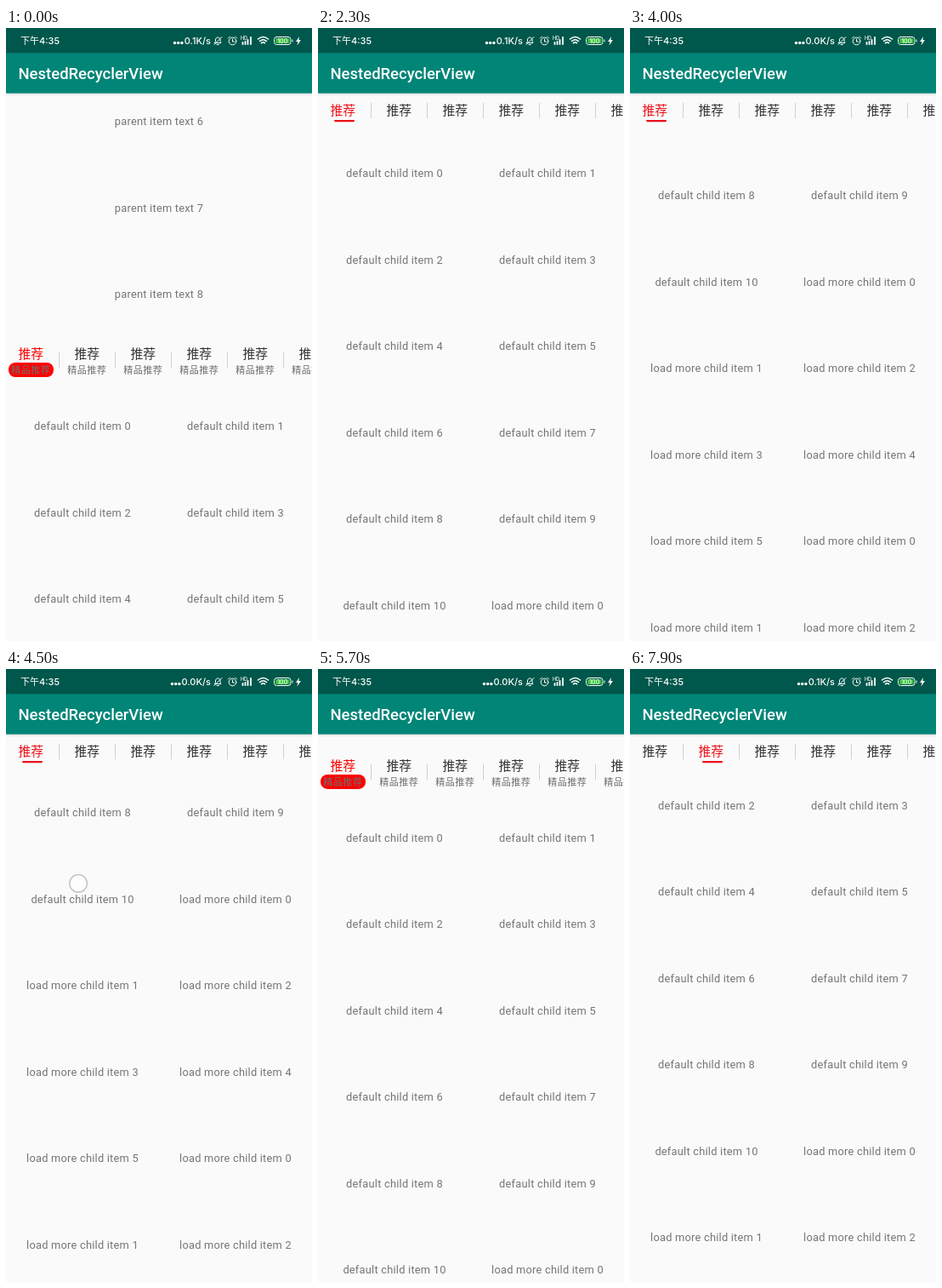
Animation of 360 by 720 pixels, one loop 8000 ms. Source, as an HTML page:

```html
<!DOCTYPE html>
<html lang="zh">
<head>
<meta charset="utf-8">
<style>
html, body { margin: 0; width: 100%; height: 100%; overflow: hidden; background: #fafafa; }
svg { display: block; }
.item { font: 12.83px Roboto, sans-serif; letter-spacing: .0178em; fill: #757575; text-anchor: middle; }
.tab { font: 14.8px "Noto Sans CJK SC", "Noto Sans CJK", sans-serif; text-anchor: middle; }
.sub { font: 11.1px "Noto Sans CJK SC", "Noto Sans CJK", sans-serif; letter-spacing: .0333em; fill: #6f6f6f; text-anchor: middle; }
.bar { font: 500 18.48px Roboto, sans-serif; fill: #fff; }
.status { font: 500 11px Inter, "Noto Sans CJK SC", "Noto Sans CJK", sans-serif; fill: #fff; }
.line { fill: none; stroke: #fff; stroke-width: 1; stroke-linecap: round; }
</style>
</head>
<body>
<svg id="stage" width="360" height="720" viewBox="0 0 360 720">
  <defs>
    <linearGradient id="shade" x2="0" y2="1">
      <stop stop-color="#000" stop-opacity=".12"/><stop offset="1" stop-color="#000" stop-opacity="0"/>
    </linearGradient>
  </defs>
  <rect width="360" height="720" fill="#fafafa"/>
  <g id="parents"></g>
  <g id="pageA"></g>
  <g id="pageB"></g>
  <g id="tabs">
    <rect id="tabBack" y="-19" width="360" fill="#fafafa"/>
    <g id="marks"></g>
    <g id="expanded"><rect id="pill" y="11" width="53" height="17" rx="8" fill="#f00"/></g>
    <rect id="underline" y="12" width="24" height="2.2" rx="1.1" fill="#ec1019"/>
    <g id="titles"></g>
  </g>
  <rect y="76" width="360" height="4" fill="url(#shade)"/>
  <rect width="360" height="76.7" fill="#008577"/>
  <rect width="360" height="29.3" fill="#00574b"/>
  <text class="bar" x="14.5" y="60.3">NestedRecyclerView</text>
  <text class="status" x="17" y="19">下午4:35</text>
  <text class="status" id="speed" x="241" y="19" text-anchor="end"></text>
  <g id="dots" fill="#fff"><circle cx="198.5" cy="17.5" r="1.7"/><circle cx="202.7" cy="17.5" r="1.7"/><circle cx="206.9" cy="17.5" r="1.7"/></g>
  <g class="line">
    <path d="M245.5 17.5h7.500c-1-1-1-2-1-3.500 0-4-5.500-4-5.500 0 0 1.500 0 2.500-1 3.500M248 19.500h2.500M254 10.500l-9 9"/>
    <circle cx="266.500" cy="15.500" r="4.300"/><path d="M266.500 13v3h2M261.500 12l2-2M271.500 12l-2-2"/>
    <path d="M278.500 19v-2M281.500 19v-3M284.500 19v-5M288 19v-8" stroke-width="1.800"/>
    <path d="M296.500 13q6-5 12 0M298.500 15.500q4-3.500 8 0M300.500 17.700q2-1.600 4 0" stroke-width="1.600"/>
    <rect x="315.500" y="10.500" width="19.500" height="9" rx="3"/><path d="M337 14v2"/>
  </g>
  <rect x="317" y="12" width="16.500" height="6" rx="1.500" fill="#35c43a"/>
  <text class="status" x="325.200" y="17.700" text-anchor="middle" style="font-size:7px">100</text>
  <text class="status" x="276" y="13.500" style="font-size:5.500px">HD</text>
  <path d="M345 10l-4 6h2.500l-1 4.500 4.500-6.500h-2.700z" fill="#fff"/>
  <circle id="touch" r="10.300" fill="#fff" fill-opacity=".6" stroke="#c4c6c9" stroke-width="1.600"/>
</svg>
<script>
const LOOP = 8000, PITCH = 101.5, TAB_STEP = 66, PINNED = 96;
const $ = id => document.getElementById(id);

function add(parent, tag, attrs, text = "") {
  const el = document.createElementNS("http://www.w3.org/2000/svg", tag);
  for (const key in attrs) el.setAttribute(key, attrs[key]);
  el.textContent = text;
  return parent.appendChild(el);
}
const set = (el, key, value) => el.setAttribute(key, value);
const move = (el, x, y) => set(el, "transform", `translate(${x} ${y})`);
const show = (el, on) => set(el, "visibility", on ? "visible" : "hidden");

for (let i = 6; i < 9; i++)
  add($("parents"), "text", { class: "item", x: 180, y: (i - 9) * PITCH - 49 }, `parent item text ${i}`);

for (const page of [$("pageA"), $("pageB")])
  for (let i = 0; i < 35; i++) {
    const label = i < 11 ? `default child item ${i}` : `load more child item ${(i - 11) % 6}`;
    add(page, "text", { class: "item", x: i % 2 ? 270 : 90, y: (i >> 1) * PITCH + 4.5 }, label);
  }

const titles = [];
for (let i = 0; i < 6; i++) {
  const x = 29.2 + i * TAB_STEP;
  titles.push(add($("titles"), "text", { class: "tab", x, y: 5.7 }, "推荐"));
  add($("expanded"), "text", { class: "sub", x, y: 24 }, "精品推荐");
  add($("marks"), "rect", { x: 62 + i * TAB_STEP, y: 0, width: 1, height: 18, fill: "#d0d0d0" });
}

// A drag speeds up under the finger, a fling slows down after it.
const drag = u => u * u;
const fling = u => 1 - (1 - u) ** 3;

// Steps: [start, end, value reached, easing]
const scroll = [
  [1600, 2000, 270, drag], [2000, 3200, 98.8, fling],
  [3400, 3600, 0, drag], [3600, 4400, -239, fling],
  [4450, 4900, -96.3, drag], [4900, 6000, 204.5, fling],
  [7300, 7600, 140, drag], [7600, 8100, 53.5, fling]
];
const swipe = [[6600, 6800, 170, drag], [6800, 7200, 360, fling]];

function valueAt(t, value, steps) {
  for (const [start, end, goal, ease] of steps) {
    if (t < start) break;
    value += (goal - value) * ease(Math.min(1, (t - start) / (end - start)));
  }
  return value;
}

// Touches: [start, end, x, y, last x, last y]
const touches = [
  [1600, 2000, 80, 549, 98, 345],
  [3400, 3600, 90, 520, 98, 415],
  [4450, 4900, 85, 250, 92, 395],
  [6600, 6800, 245, 480, 67, 472],
  [7300, 7600, 85, 500, 95, 430]
];
const FADE = 150;

function drawTouch(t) {
  const hit = touches.find(([start, end]) => t >= start && t < end + FADE);
  show($("touch"), hit);
  if (!hit) return;
  const [start, end, x, y, lastX, lastY] = hit;
  const u = drag(Math.min(1, (t - start) / (end - start)));
  move($("touch"), x + (lastX - x) * u, y + (lastY - y) * u);
  set($("touch"), "opacity", Math.min(1, 1 - (t - end) / FADE) ** 2);
}

function draw(t) {
  const y = valueAt(t, 467.5, scroll);
  const pageX = valueAt(t, 0, swipe);
  const tabY = Math.max(PINNED, y - 85.5);
  const pinned = tabY === PINNED;
  const selected = pageX > 180 ? 1 : 0;

  move($("parents"), 0, y);
  move($("pageA"), -pageX, y);
  move($("pageB"), 360 - pageX, y);

  move($("tabs"), 0, tabY);
  set($("tabBack"), "height", pinned ? 39 : 54);
  move($("marks"), 0, pinned ? -8 : -1);
  show($("expanded"), !pinned);
  show($("underline"), pinned);
  set($("pill"), "x", 3 + selected * TAB_STEP);
  set($("underline"), "x", 19 + selected * TAB_STEP);
  titles.forEach((el, i) => set(el, "fill", i !== selected ? "#333" : pinned ? "#ec1019" : "#f00"));

  const idle = t >= 3000 && t < 7500;
  $("speed").textContent = idle ? "0.0K/s" : "0.1K/s";
  move($("dots"), idle ? -3 : 0, 0);
  drawTouch(t);
}

const begin = performance.now();
function tick() {
  draw((performance.now() - begin) % LOOP);
  requestAnimationFrame(tick);
}
tick();
</script>
</body>
</html>
```
